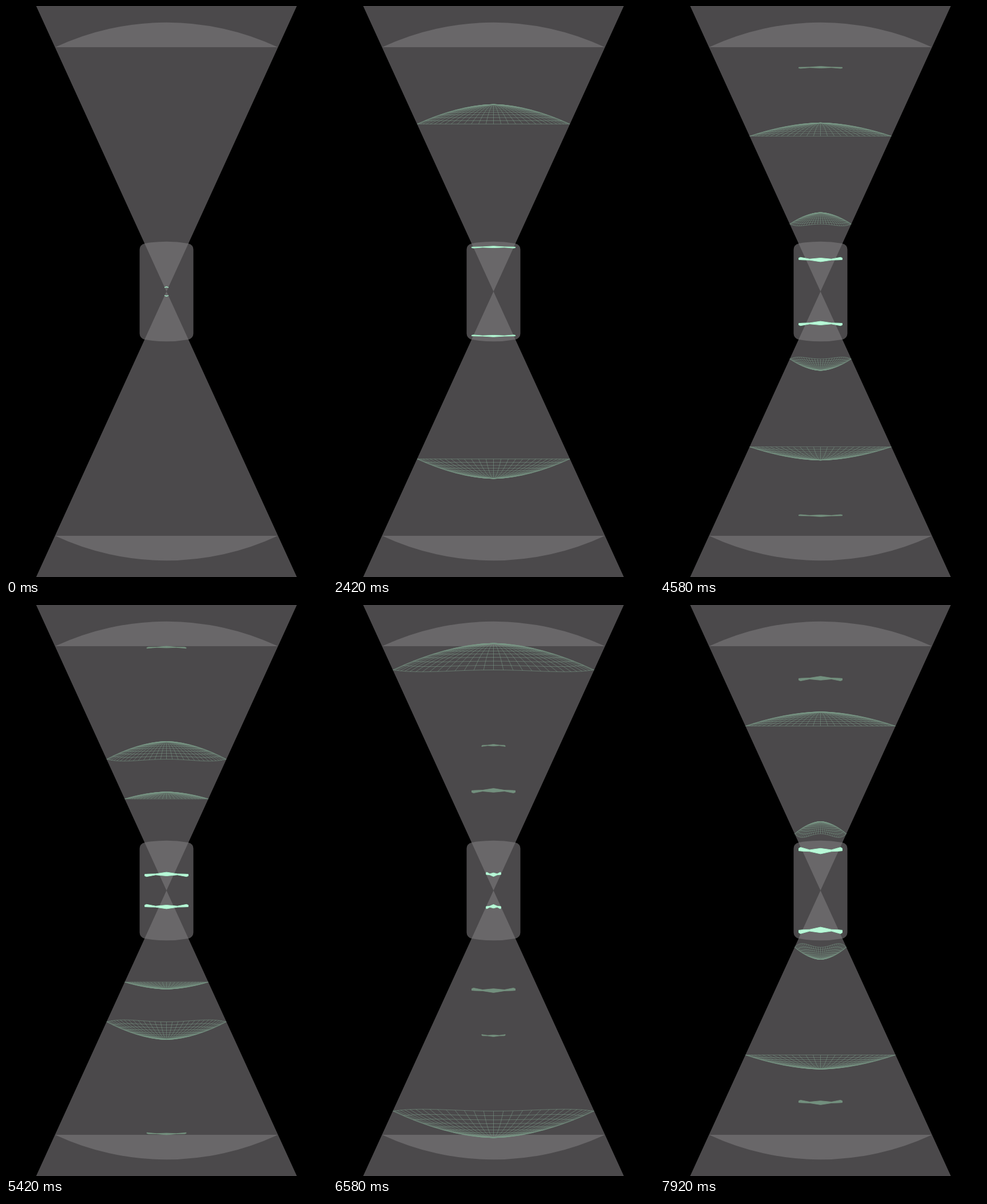
Write an HTML page that moves like this. It is 561 px wide and 998 px high and loops after 8 s.

```html
<!DOCTYPE html>
<html lang="en">
<head>
<meta charset="utf-8">
<title>Light cavity</title>
<style>
  html, body { margin: 0; width: 100%; height: 100%; overflow: hidden; background: #000; }
  svg { display: block; width: 100%; height: 100%; }
  .glass { fill: #4b494b; }
  .lit { fill: #696769; }
  .mesh { fill: none; stroke: #7c9a89; stroke-width: .7; opacity: .78; }
  .dim { fill: #728f7e; stroke: #77937f; stroke-width: .8; stroke-linejoin: round; }
  .bright { fill: #b9f8d8; stroke: #a9f5cd; stroke-width: 1; stroke-linejoin: round; }
</style>
</head>
<body>
<svg viewBox="0 0 561 998">
  <defs>
    <path id="box" d="M233.5 426Q233.5 417 243 415Q280.500 408.300 318 415Q327.500 417 327.500 426V572Q327.500 581 318 583Q280.500 589.700 243 583Q233.500 581 233.500 572Z"/>
    <path id="cone" d="M52.700 0H508.300L52.700 998H508.300Z"/>
    <clipPath id="inBox"><use href="#box"/></clipPath>
  </defs>
  <rect width="561" height="998"/>
  <use href="#cone" class="glass"/>
  <use href="#box" class="glass"/>
  <use href="#cone" class="lit" clip-path="url(#inBox)"/>
  <path class="lit" d="M86 72A459 459 0 0 1 475 72ZM86 926A459 459 0 0 0 475 926Z"/>
  <g id="waves">
    <path class="mesh"/>
    <path class="dim"/>
    <path class="bright"/>
  </g>
  <use href="#waves" transform="matrix(1 0 0 -1 0 998)"/>
</svg>
<script>
const LOOP = 8000, STEP = 1000 / 12;
const CX = 280.5, CY = 499;
const SPREAD = 0.456;            // half width of the cone per unit of distance
const SAG = 0.09;                // depth of a spherical front per unit of distance
const NEAR = 87, FAR = 470;      // inner and outer mirror
const LEG = 863;                 // centre to inner mirror, in ms
const SLOW = NEAR / LEG, FAST = 0.147;
const TRIP = (FAR - NEAR) / FAST;
const BEAM = 38;                 // half width of the collimated front
const LAG = [0, 4, 6];           // drift of the flat front per round trip
const AMP = [0.35, 0.8, 1.2];    // ripple per round trip

const layer = name => document.querySelector('#waves .' + name);
const layers = { mesh: layer('mesh'), dim: layer('dim'), bright: layer('bright') };

const point = (x, p) => (CX + x).toFixed(2) + ' ' + (CY - p).toFixed(2);
const line = pts => 'M' + pts.join('L');
const range = (n, f) => Array.from({ length: n + 1 }, (_, i) => f(i / n));

// Domed net seen from the side: rings and meridians.
function dome(p, extra, ripple) {
  const sag = SAG * p + extra;
  const w = SPREAD * (p - sag);
  const at = (r, a) => point(
    w * r * Math.sin(a),
    p - sag * r ** 1.8 - ripple * r ** 4 * Math.sin(2 * a) ** 2
  );
  const angle = k => (k - 0.5) * Math.PI;
  const rings = range(10, r => r ? line(range(24, k => at(r, angle(k)))) : '');
  const ribs = range(32, k => line(range(8, r => at(r, angle(k)))));
  return rings.join('') + ribs.join('');
}

const FRONT = [[0, 5], [0.5, 1.5], [0.85, 1], [1, 0.5]];
const BACK = [[1, -3], [0.92, -4.5], [0.5, -0.8], [0, -3]];

// Thin solid front; dir is +1 when it travels outwards.
function blade(p, w, sag, amp, dir) {
  const half = [...FRONT, ...BACK];
  const place = ([u, z], side) => point(side * u * w, p - sag * u * u + dir * amp * z);
  const right = half.map(q => place(q, 1));
  const left = half.map(q => place(q, -1)).reverse();
  return line([...right, ...left]) + 'Z';
}

function draw(t) {
  const out = { mesh: '', dim: '', bright: '' };
  const during = (start, length, f) => {
    if (t >= start && t < start + length) f(t - start);
  };

  for (let i = 0; i < 3; i++) {
    const birth = -78 + 4 * LEG * i;
    const hit = birth + LEG;
    const leave = birth + 3 * LEG;
    const amp = AMP[i], lag = LAG[i];

    // inside the box: diverging, flat, converging
    during(birth, LEG, dt => {
      const p = SLOW * dt, sag = SAG * p;
      out.bright += blade(p, SPREAD * (p - sag), sag, amp * Math.min(0.6, 0.1 + p / 50), 1);
    });
    during(hit, 2 * LEG, dt => {
      const p = Math.min(83, NEAR + lag - SLOW * dt);
      out.bright += blade(Math.abs(p), BEAM, 0, amp, p > 0 ? -1 : 1);
    });
    during(leave, LEG, dt => {
      const p = Math.min(83, NEAR + lag - SLOW * dt);
      out.bright += blade(p, SPREAD * p, 0, 0.4 + amp / 2, -1);
    });

    // diverging front, out and back
    during(hit, TRIP, dt => {
      out.mesh += dome(NEAR + FAST * dt, 4.7 + 2.8 * i, 3.3 * i);
    });
    during(hit + TRIP, TRIP, dt => {
      out.mesh += dome(FAR - FAST * dt, -3.5, 0);
    });

    // collimated front, out and focused back
    during(leave, TRIP, dt => {
      out.dim += blade(NEAR - lag + FAST * dt, BEAM, 0, amp * 1.05, 1);
    });
    during(leave + TRIP, TRIP, dt => {
      const p = FAR - FAST * dt;
      out.dim += blade(p, BEAM * p / FAR, 2.5, 0.35, -1);
    });
  }
  for (const name in layers) layers[name].setAttribute('d', out[name]);
}

const begin = performance.now();
function tick() {
  const t = (performance.now() - begin) % LOOP;
  draw(Math.floor(t / STEP + 0.05) * STEP % LOOP);
  requestAnimationFrame(tick);
}
tick();
</script>
</body>
</html>
```
